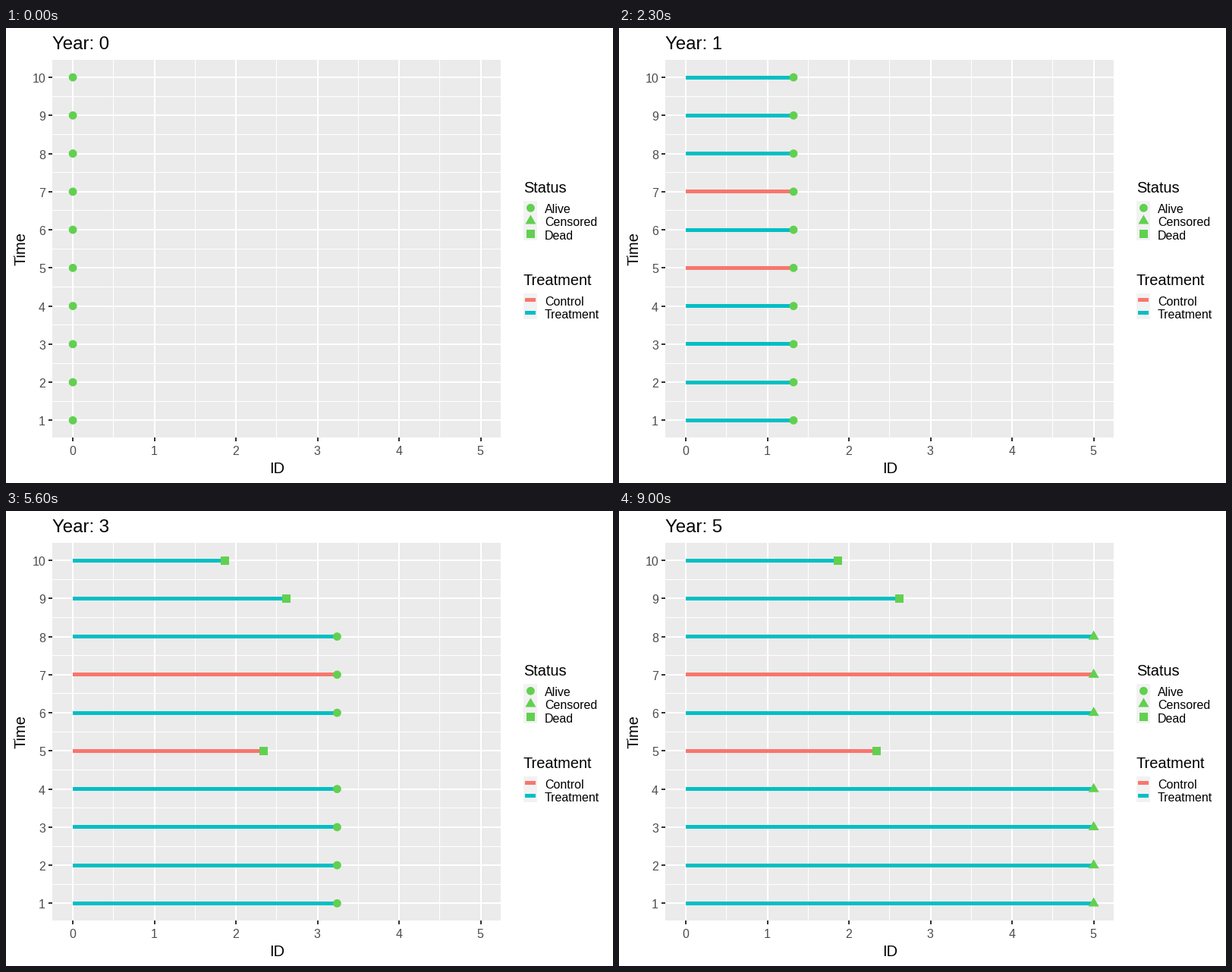
Animation of 800 by 600 pixels, one loop 10000 ms. Source, as a matplotlib script:

```python
import math

import numpy as np
import matplotlib.pyplot as plt
from matplotlib.animation import FuncAnimation
from matplotlib.patches import Polygon, Rectangle

W, H, DPI = 800, 600, 100
GREEN, RED, TEAL = "#61D04F", "#F8766D", "#00BFC4"
GREY, DARK = "#4D4D4D", "#333333"
LEFT, TOP, RIGHT, BOTTOM = 61, 42, 652, 540

plt.rcParams["font.family"] = "Liberation Sans"
fig = plt.figure(figsize=(W / DPI, H / DPI), dpi=DPI, facecolor="white")
ax = fig.add_axes([0, 0, 1, 1])
ax.set_xlim(0, W)
ax.set_ylim(H, 0)
ax.axis("off")


def px(t):
    return 88.1 + 107.5 * t


def py(row):
    return 517.4 - 50.26 * (row - 1)


def box(x0, y0, x1, y1, color, z=1):
    patch = Rectangle((x0, y0), x1 - x0, y1 - y0, fc=color, lw=0, zorder=z)
    return ax.add_patch(patch)


def text(x, y, s, size, color="black", ha="left", **kw):
    return ax.text(x, y, s, fontsize=size * 72 / DPI, color=color, ha=ha,
                   va="baseline", zorder=6, **kw)


angles = np.linspace(0, 2 * np.pi, 48, endpoint=False)
SHAPES = {
    "Alive": 5.4 * np.column_stack([np.cos(angles), np.sin(angles)]),
    "Censored": np.array([(0, -8), (7, 4.1), (-7, 4.1)]),
    "Dead": 5.5 * np.array([(-1, -1), (1, -1), (1, 1), (-1, 1)]),
}


def marker(x, y, status):
    shape = Polygon(SHAPES[status] + (x, y), fc=GREEN, lw=0, zorder=4)
    return ax.add_patch(shape)


# Panel, grid and axes
box(LEFT, TOP, RIGHT, BOTTOM, "#EBEBEB", 0)
for i in range(5):
    x = math.floor(px(i + 0.5))
    box(x, TOP, x + 1, BOTTOM, "white")
for i in range(1, 10):
    y = math.floor(py(i + 0.5))
    box(LEFT, y, RIGHT, y + 1, "white")
for i in range(6):
    x = round(px(i))
    box(x - 1, TOP, x + 1, BOTTOM, "white")
    box(x - 1, BOTTOM, x + 1, BOTTOM + 5, DARK)
    text(px(i) - 0.3, 563, str(i), 16, GREY, "center")
for i in range(1, 11):
    y = round(py(i))
    box(LEFT, y - 1, RIGHT, y + 1, "white")
    box(LEFT - 5, y - 1, LEFT, y + 1, DARK)
    text(52, y + 7, str(i), 16, GREY, "right")
text(357, 587, "ID", 20, ha="center")
text(26, 291, "Time", 20, ha="center", rotation=90, rotation_mode="anchor")
title = text(61, 28, "", 24)

# Legends
text(682, 217, "Status", 20)
box(682, 228, 700, 280, "#F2F2F2")
for i, status in enumerate(SHAPES):
    marker(691.4, 237.3 + 17.1 * i, status)
    text(710, 244 + 17.3 * i, status, 16)
text(682, 339, "Treatment", 20)
box(682, 350, 700, 384, "#F2F2F2")
for i, (name, color) in enumerate([("Control", RED), ("Treatment", TEAL)]):
    box(684, 356 + 17 * i, 698, 361 + 17 * i, color, 3)
    text(710, 366 + 17 * i, name, 16)

# Follow-up advances in steps of 0.3 years, each a whole number of frames
STEP, END = 0.3, 5
DEATHS = {5: 2.335, 9: 2.614, 10: 1.862}
times = STEP * np.arange(18)
knots = [round(5.22 * k) for k in range(18)]

bars, dots = {}, {}
for row in range(1, 11):
    y = round(py(row) - 2.5)
    bars[row] = box(88, y, 88, y + 5, RED if row in (5, 7) else TEAL, 3)
    dots[row] = marker(px(0), py(row), "Alive")


def draw(i):
    f = min(i, 90)
    title.set_text(f"Year: {round((f + 1) / 20)}")
    for row in bars:
        end = DEATHS.get(row, END)
        x = px(np.interp(f, knots, np.minimum(times, end)))
        status = "Alive"
        if f > knots[math.ceil(end / STEP) - 1]:
            status = "Dead" if row in DEATHS else "Censored"
        bars[row].set_width(max(0, x - 88))
        bars[row].set_visible(f > 0)
        dots[row].set_xy(SHAPES[status] + (x, py(row)))
    return [title, *bars.values(), *dots.values()]


anim = FuncAnimation(fig, draw, frames=100, interval=100, repeat=True,
                     repeat_delay=0, blit=False)
plt.show()
```
